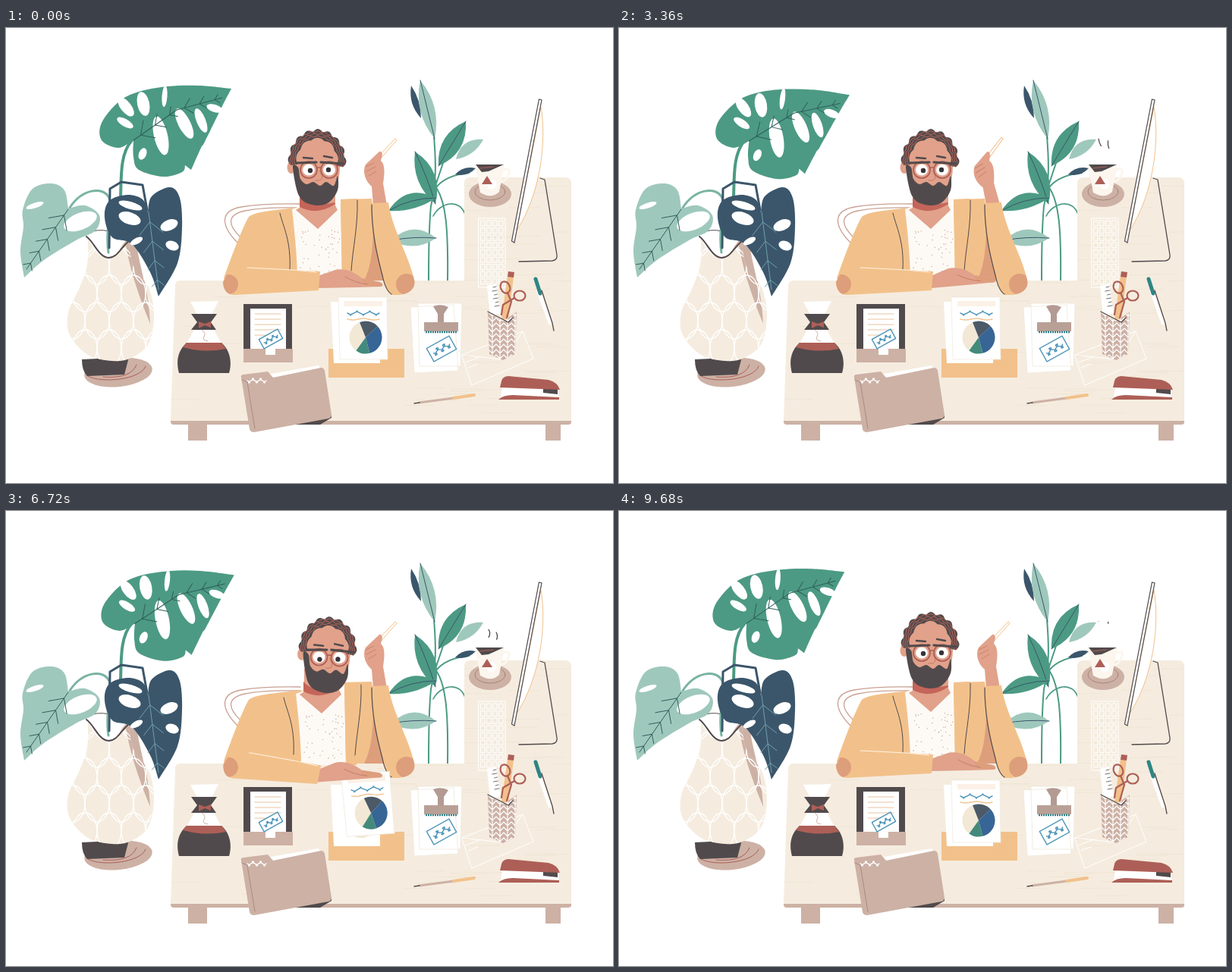
These frames come from a looping animation (800 by 600 pixels, 9760 ms). An HTML page:

```html
<!DOCTYPE html>
<html lang="en">
<head>
<meta charset="utf-8">
<title>At the desk</title>
<style>
html,body{margin:0;width:100%;height:100%;overflow:hidden;background:#fff}
svg{display:block;width:100vw;height:100vh}
.l{fill:none;stroke-linecap:round;stroke-linejoin:round}
.d{stroke:#514a4c}.w{stroke:#fff}.o{stroke:#f2c18b}.r{stroke:#ad5f57}.b{stroke:#4a93b8}
.dark{fill:#514a4c}.red{fill:#ad5f57}.tan{fill:#cdb1a5}.cream{fill:#f5ecdf}.coat{fill:#f2c18b}
.skin{fill:#e1a18a}.shade{fill:#dd9e7b}.white{fill:#fff}.pale{fill:#9fc8bc}.green{fill:#4c9a84}.navy{fill:#3b566b}
</style>
</head>
<body>
<!-- data-c: points of a smooth closed curve, a doubled point is a corner -->
<svg viewBox="0 0 800 600" xmlns="http://www.w3.org/2000/svg">
<defs>
<clipPath id="deskClip"><path d="M230 333H604V205Q604 197 612 197H737Q745 197 745 205V518H217L223 340Q223 333 230 333Z"/></clipPath>
<clipPath id="vaseClip"><path data-c="108,277 108,277 119,296 135,303 149,294 162,284 162,284 168,315 188,342 195,378 188,416 165,435 140,439 108,431 84,405 82,375 97,342 107,312"/></clipPath>
<clipPath id="cupClip"><path d="M635 374L655 387L673 374L671 430L655 438L637 430Z"/></clipPath>
<clipPath id="armR"><path d="M482 231L504 230C509 266 531 300 538 332C541 346 527 353 511 352C503 352 500 342 496 326C488 298 482 270 482 231Z"/></clipPath>
<clipPath id="armL"><path d="M298 312L414 321L412 346L301 352Q287 352 286 335Z"/></clipPath>
</defs>

<g class="l" stroke="#4c9a84" stroke-width="2">
  <path d="M564 143C567 180 567 205 560 235Q557 265 557 333"/>
  <path d="M563 248C572 230 598 224 605 246" stroke-width="1.6"/>
  <path d="M567 210Q580 194 610 191M567 205L577 175"/>
  <path d="M568 212C579 230 583 260 582 333"/>
</g>
<g id="plantR"></g>

<g class="l" stroke="#c9a193" stroke-width="1.3">
  <path id="chair" d="M306 284C282 260 282 241 310 236Q340 231 388 232"/>
  <path d="M309 276C291 258 292 246 315 241Q340 236 388 237"/>
</g>

<ellipse class="tan" cx="148" cy="454" rx="45" ry="19" transform="rotate(-6 148 454)"/>
<path class="l r" d="M108 459C125 469 178 464 184 446M128 460Q165 463 172 444"/>
<path class="dark" d="M100 437L162 434L156 457L107 459Q100 452 100 437Z"/>
<path class="l d" d="M107 271Q120 264 136 268"/>
<path class="l" stroke="#4c9a84" stroke-width="4" d="M166 148C150 166 152 196 151 225"/>
<path class="l" stroke="#79b3a2" stroke-width="3" d="M84 237C100 212 128 208 136 224C140 240 130 265 135 296"/>
<path class="l" stroke="#3b566b" stroke-width="3" d="M136 290L137 212L152 203L180 207L186 240"/>
<path class="tan" d="M150 292Q158 276 172 274C171 303 187 335 189 388Z"/>
<g clip-path="url(#vaseClip)">
  <path class="cream" d="M70 260H200V445H70Z"/>
  <path class="tan" d="M158 286L172 274C171 303 188 335 190 390Q165 330 158 286Z"/>
  <g id="scales" class="l w" stroke-width="1.3"></g>
</g>
<path class="l d" stroke-width="2" d="M106 275C116 282 122 302 135 303C149 303 152 285 170 275"/>

<path class="pale" data-c="24,329 24,329 19,295 23,262 22,240 35,212 60,205 77,214 82,238 82,238 104,234 123,247 118,267 92,280 50,306"/>
<g id="paleHoles"></g>
<g id="bigLeaf">
  <path class="green" data-c="297,80 297,80 285,103 262,150 257,158 244,187 244,187 236,181 236,181 232,190 207,196 175,187 168,170 168,148 168,148 148,158 126,148 126,125 149,97 175,84 213,77 255,76"/>
  <g id="bigHoles"></g>
</g>
<path class="navy" data-c="201,354 201,354 190,322 166,285 140,276 130,250 136,228 160,220 180,226 187,243 187,243 192,222 216,210 229,224 232,263 226,310"/>
<g id="navyHoles"></g>

<path class="tan" d="M240 520H265V544H240ZM711 520H731V544H711ZM217 515H745V520Q745 523 741 523H221Q217 523 217 519Z"/>
<g clip-path="url(#deskClip)">
  <path class="cream" d="M210 190H750V518H210Z"/>
  <path id="grain" class="l" stroke="#f0e5d4"/>
</g>

<path class="l d" stroke-width="1.3" d="M704 198L710 200L726 299Q727 306 720 307L676 308"/>
<path class="white" stroke="#f2c18b" d="M705 104C713 150 704 220 673 267Z"/>
<path class="white d" stroke-width="1.2" d="M702.500 94L706 95L670 283L666.500 281Z"/>
<path id="keys" class="l w"/>

<ellipse class="tan" cx="638" cy="219" rx="28" ry="17"/>
<ellipse class="l" cx="638" cy="216" rx="20" ry="11" stroke="#a98579"/>
<path class="l" stroke="#fcf6ee" stroke-width="3" d="M655 187Q667 183 662 194Q659 202 652 203"/>
<path fill="#fcf6ee" d="M618 180H657L650 216Q640 226 625 217Z"/>
<path class="dark" d="M619 180H656L636 189L627 190Z"/>
<path class="l r" d="M624 185L642 183"/>
<circle class="white" cx="640" cy="206" r="6.500"/>
<path class="red" d="M634 195L641 206H627Z"/>
<g class="l d" stroke-width="1.3" style="stroke-linecap:butt">
  <path id="steamA" pathLength="1" d="M633 180C628 171 641 167 637 158Q632 151 632 145"/>
  <path id="steamB" pathLength="1" d="M642 180C642 172 650 170 647 162Q643 154 645 146"/>
</g>

<path class="coat" d="M380 237C350 241 328 242 320 249C312 262 296 304 287 330L300 345L380 333H498L482 225L442 226L420 236Z"/>
<path class="shade" d="M484 262L498 333H472Q484 310 484 262Z"/>
<g id="shirt">
  <path fill="#fdfaf6" d="M377 239L390 234L441 226L443 333H384Q384 300 377 239Z"/>
  <path class="coat" d="M441 226L462 225L457 333H443Z"/>
  <g id="dots" fill="#d5b3a1"></g>
  <path class="skin" d="M382 240L388 236V206H434V234L437 240L411 265Z"/>
  <path fill="#c4655a" d="M387 223Q398 238 433 230L434 232Q410 248 387 236Z"/>
  <path class="l d" d="M361 244C365 262 376 280 374 319M463 227C464 262 457 290 455 320"/>
</g>
<g id="armUp">
  <path class="white o" d="M489 171L513 146L515 148L492 174Z"/>
  <path class="skin" d="M484 234L482 209C474 202 469 190 474 180L492 163Q495 162 496 167L494 175C500 180 499 193 497 205L502 234Z"/>
  <path class="l" stroke="#c98570" d="M474 183L485 178M475 189L487 183M478 195L488 189"/>
</g>
<g clip-path="url(#armR)">
  <path class="coat" d="M480 225H545V356H480Z"/>
  <circle class="shade" cx="528" cy="338" r="14"/>
</g>
<path class="l d" stroke-width="1.2" d="M482 233C482 270 489 300 496 326Q500 346 508 351"/>

<g id="head">
  <ellipse class="skin" cx="376" cy="184" rx="5.500" ry="8"/>
  <path class="skin" data-c="380,170 388,148 412,141 434,148 440,175 437,205 425,229 404,230 388,218 382,195"/>
  <path class="dark" data-c="378,183 385,184 388,199 396,206 405,203 414,208 422,203 432,208 437,195 437,214 424,231 403,233 386,221"/>
  <path id="hair" class="dark"/>
  <g id="curls" class="l" stroke="#c9685a" stroke-width=".9"></g>
  <path class="l d" stroke-width="2.500" d="M392 171L404 172M419 169L430 171"/>
  <g id="eyes">
    <path class="white" d="M391 187a8 7.500 0 0 1 16 0a8 7.500 0 0 1 -16 0M418 187a8 7.500 0 0 1 16 0a8 7.500 0 0 1 -16 0"/>
    <path id="pupils" class="l" stroke="#363338" stroke-width="6.400" d="M401 188h0M425 187h0"/>
  </g>
  <path id="lids" class="l" stroke="#a9604f" d="M392 189Q399 193 406 189M419 189Q426 193 433 189"/>
  <path class="l" stroke="#c07c68" d="M413 188C418 196 419 202 408 201"/>
  <path class="l r" stroke-width="1.700" d="M388 187a11 11 0 0 1 22 0a11 11 0 0 1 -22 0M415 187a11 11 0 0 1 22 0a11 11 0 0 1 -22 0M410 184H415"/>
  <path class="l d" stroke-width="3.200" d="M383 178L409 177M415 177L445 179"/>
</g>

<path class="white" d="M243 361L280 360L271 378H252ZM249 396H273L285 418H237Z"/>
<path class="dark" d="M244 377H278L270 388L277 398H244L252 388ZM238 415H284C296 426 298 441 294 455H228C224 440 226 426 238 415Z"/>
<path class="red" d="M238 415H284L290 423Q262 429 233 421ZM254 387L262 390L270 387V395L262 392L254 396Z"/>
<path class="l" stroke="#cdb1a5" d="M258 398Q264 402 261 407T266 413"/>

<path class="dark" d="M313 364H377V425H313Z"/><path class="white" d="M322 370H369V426H322Z"/>
<path id="lines" class="l" stroke="#e8c3a2"/>
<path class="tan" d="M313 423H378V441H313Z"/><path class="white" d="M342 423H355V431H342Z"/>

<path class="dark" d="M380 516L429 510V514L414 523H380Z"/>
<path class="white" d="M344 457L412 445L416 452L355 468Z"/>
<path class="tan" d="M310 461Q309 457 313 457L345 453L352 461L415 448Q419 448 420 452L429 510Q429 514 425 515L327 533Q322 533 321 529Z"/>
<path class="l" stroke="#a98b81" d="M311 464L318 467L328 528"/>

<path class="coat" d="M425 423H525V461H425Z"/>
<path class="white" d="M428 361H484L493 366V442H432Z"/>
<path fill="#f3e8d6" d="M452 420A17 17 0 0 0 484 420Z"/>
<g id="sheet">
  <path class="white" stroke="#f0e7db" stroke-width=".7" d="M438 355H502L503 437H440Z"/>
  <path fill="#fcf1e7" d="M446 360H496V367H446Z"/>
  <g id="notes"></g>
  <g id="pie"></g>
</g>

<g id="forearm">
  <g id="hand">
    <path class="skin" d="M411 327L434 319C447 316 460 322 469 330L493 335Q499 338 495 341L462 342L411 343Z"/>
    <path class="shade" d="M468 331L494 336Q497 340 493 341L473 339Z"/>
    <path class="l" stroke="#c07c68" stroke-width=".9" d="M447 328Q460 336 476 338"/>
  </g>
  <path class="coat" d="M298 312L378 319L414 321L412 346L301 352Q287 352 286 335Z"/>
  <path class="l" stroke="#fff4e4" d="M318 316L378 319L409 322"/>
  <circle class="shade" cx="293" cy="338" r="13" clip-path="url(#armL)"/>
</g>

<path class="white" stroke="#f0e7db" stroke-width=".8" d="M533 368L590 365L596 452L538 455ZM543 363H601L599 446H545Z"/>
<path fill="#b39a92" d="M563 367Q573 363 583 368L577 377V388H569V377Z"/>
<path fill="#b9a097" d="M551 388H596V400H551Z"/>
<path stroke="#2f7f86" stroke-width="2.500" stroke-dasharray="2 1" d="M553 401H595"/>
<g id="stamps"></g>

<path class="l w" d="M601 431L681 400L695 436L614 471ZM601 431L655 437L681 400M606 441L626 433M609 448L622 443"/>

<path class="white" d="M634 340L646 337L652 376L638 380Z"/>
<path id="ticks" class="l d" stroke-width=".8"/>
<path class="coat" d="M661 327L669 328L662 384H653Z"/><path class="red" d="M662 321L670 322L669 329L661 328Z"/>
<g class="l r" stroke-width="2.200"><ellipse cx="658" cy="342" rx="6" ry="8" transform="rotate(-25 658 342)"/><ellipse cx="677" cy="353" rx="7.500" ry="6.500"/><path d="M661 349L666 361L660 382M670 356L655 365L653 378"/></g>
<g clip-path="url(#cupClip)"><path class="tan" d="M630 370H680V440H630Z"/><path id="weave" class="l w" stroke-width="1.2"/></g>
<path class="l d" stroke-width="1.3" d="M635 374L662 388L668 382"/>

<path class="l" stroke="#cdb1a5" stroke-width="3" d="M545 494L590 488"/><path class="l o" stroke-width="4" d="M590 488L617 484"/>
<path class="l d" stroke-width="1.3" d="M538 495L545 494"/>
<path class="l w" stroke-width="5" d="M702 347L717 389"/>
<path class="l" stroke="#2f8584" stroke-width="5" d="M698 331L704 350"/>
<path class="l d" stroke-width="1.3" d="M706 346L720 389L722 399"/>

<path class="white" d="M654 474H728V487H652Z"/>
<path class="dark" d="M708 475H727V483L708 481Z"/>
<path class="red" d="M652 470Q653 459 662 459L715 464Q727 467 730 477L704 476L651 474ZM649 490Q655 484 668 484L729 487V490Z"/>
</svg>
<script>
const $ = id => document.getElementById(id);
const LOOP = 9760, STEP = 80, TAU = 2 * Math.PI;

let seed = 7;
const rnd = () => (seed = seed * 16807 % 2147483647) / 2147483647;
const repeat = (n, f) => Array.from({length: n}, (_, i) => f(i)).join('');
const line = (n, f) => 'M' + repeat(n + 1, i => f(i / n).map(v => v.toFixed(1)) + ' ');

// smooth closed curve through points
function blob(pts) {
  const n = pts.length, at = i => pts[(i + n) % n];
  return `M${pts[0]}` + repeat(n, i => {
    const [a, b, c, d] = [-1, 0, 1, 2].map(k => at(i + k));
    if (b + '' === c + '') return '';
    return `C${b.map((v, k) => v + (c[k] - a[k]) / 6)} ${c.map((v, k) => v - (d[k] - b[k]) / 6)} ${c}`;
  }) + 'Z';
}
document.querySelectorAll('[data-c]').forEach(p =>
  p.setAttribute('d', blob(p.dataset.c.split(' ').map(s => s.split(',').map(Number)))));

// pointed leaf between two ends, optionally bent and with a midrib
function leaf(x1, y1, x2, y2, w, cls, bend = 0, rib = '') {
  const len = Math.hypot(x2 - x1, y2 - y1), ux = (y1 - y2) / len, uy = (x2 - x1) / len;
  const mid = s => `${(x1 + x2) / 2 + ux * s} ${(y1 + y2) / 2 + uy * s}`;
  const vein = rib && `<path class="l" stroke="${rib}" d="M${x1} ${y1}Q${mid(bend)} ${x2} ${y2}"/>`;
  return `<path class="${cls}" d="M${x1} ${y1}Q${mid(bend + w)} ${x2} ${y2}Q${mid(bend - w)} ${x1} ${y1}Z"/>` + vein;
}
const hole = (x, y, rx, ry, a) =>
  `<ellipse class="white" cx="${x}" cy="${y}" rx="${rx}" ry="${ry}" transform="rotate(${a} ${x} ${y})"/>`;

// midrib with paired side veins
function veins(x1, y1, x2, y2, n, size, color) {
  const dx = x2 - x1, dy = y2 - y1, len = Math.hypot(dx, dy), ux = dx / len, uy = dy / len;
  return `<path class="l" stroke="${color}" d="M${x1} ${y1}L${x2} ${y2}` + repeat(n, i => {
    const f = (i + .5) / n, x = x1 + dx * f, y = y1 + dy * f, s = size * (1 - f * .6);
    return [1, -1].map(k => `M${x} ${y}l${(ux - k * uy) * s * .7} ${(uy + k * ux) * s * .7}`).join('');
  }) + '"/>';
}

// pen scribble
const scribble = (x, y, w, amp, n, cls) => `<path class="l ${cls}" stroke-width="1.4" d="` +
  line(24, f => [x + w * f + amp * .7 * Math.sin(f * n * TAU * 2), y + amp * Math.sin(f * n * TAU)]) + '"/>';

$('plantR').innerHTML =
  leaf(534, 76, 547, 119, 9, 'navy', 2) + leaf(546, 69, 565, 146, 19, 'pale', 0, '#3b566b') +
  leaf(629, 147, 593, 173, 15, 'pale', 4) + leaf(606, 123, 570, 182, 24, 'green', 0, '#3b566b') +
  leaf(539, 163, 566, 232, 23, 'green', -3, '#3b566b') + leaf(592, 193, 619, 185, 8, 'navy') +
  leaf(504, 241, 567, 224, 20, 'green', -9, '#3b566b') + leaf(508, 280, 567, 277, 22, 'pale', -4, '#3b566b');

$('paleHoles').innerHTML = hole(98, 255, 23, 11, -22) + hole(38, 234, 12, 3.5, -18) +
  veins(82, 239, 27, 318, 5, 22, '#2f5f5c');
$('bigHoles').innerHTML =
  hole(158, 104, 7, 15, -38) + hole(181, 100, 8, 16, -12) + hole(209, 90, 3.5, 14, 4) +
  hole(157, 125, 12, 5, 30) + hole(180, 166, 5, 8, 22) + hole(204, 142, 9, 26, -13) +
  hole(235, 126, 8, 22, -27) + hole(257, 122, 6, 17, -22) + hole(275, 106, 11, 5, 18) +
  veins(168, 148, 225, 108, 3, 22, '#2f5f5c') + veins(225, 108, 285, 92, 3, 16, '#2f5f5c');
$('navyHoles').innerHTML =
  hole(164, 234, 16, 5, 16) + hole(163, 251, 15, 8, 18) + hole(215, 260, 12, 7, -22) +
  hole(219, 287, 9, 6, 20) + hole(172, 281, 9, 4, -28) + veins(188, 243, 201, 345, 4, 24, '#6f9fae');

$('scales').innerHTML = repeat(25, i => {
  const row = Math.floor(i / 5);
  return `<ellipse cx="${72 + i % 5 * 32 + row % 2 * 16}" cy="${278 + row * 36}" rx="16" ry="24"/>`;
});
$('grain').setAttribute('d', repeat(90, () =>
  `M${215 + rnd() * 510} ${200 + rnd() * 315}q${8 + rnd() * 20} ${rnd() * 3 - 1.5} 40 0`));
$('dots').innerHTML = repeat(44, () =>
  `<circle cx="${388 + rnd() * 52}" cy="${266 + rnd() * 60}" r=".8"/>`);
$('keys').setAttribute('d', 'M623 251H658V342H623Z' + repeat(36, i =>
  `M${626 + i % 4 * 8} ${254 + Math.floor(i / 4) * 9.6}h5v7h-5z`));
$('weave').setAttribute('d', repeat(40, i =>
  `M${636 + i % 4 * 10} ${368 + Math.floor(i / 4) * 7}l5 5l5 -5`) + repeat(4, i => `M${641 + i * 10} 370V438`));
$('lines').setAttribute('d', repeat(5, i => `M328 ${377 + i * 7}h${i < 4 ? 34 : 14}`));
$('ticks').setAttribute('d', repeat(6, i => `M${646 + i * .8} ${341 + i * 5}l${i % 2 ? -6 : -4} 1`));

const stamp = (x, y, w, h) => `<g transform="translate(${x} ${y}) rotate(-29)">
  <rect class="l b" stroke-width="1.4" x="${-w / 2}" y="${-h / 2}" width="${w}" height="${h}"/>
  ${scribble(-w * .36, 0, w * .72, h * .2, 2.5, 'b')}</g>`;
$('stamps').innerHTML = stamp(349, 410, 28, 14) + stamp(574, 423, 34, 20) + scribble(318, 465, 25, 3, 2.5, 'w');
$('notes').innerHTML = scribble(450, 376, 42, 3, 2.5, 'b') + scribble(450, 384, 42, 1, 1.5, 'o');

// slices as [from, to, colour] in turns, clockwise from the top
$('pie').innerHTML = '<circle cx="474" cy="408" r="21.5" fill="#f3e8d6"/>' +
  [[-.06, .13, '#4c5967'], [.13, .46, '#376596'], [.46, .6, '#438a7c']].map(([a, b, fill]) => {
    const rim = u => `${474 + 21.5 * Math.sin(u * TAU)} ${408 - 21.5 * Math.cos(u * TAU)}`;
    return `<path fill="${fill}" d="M474 408L${rim(a)}A21.5 21.5 0 0 1 ${rim(b)}Z"/>`;
  }).join('');

// hair is a scalloped band around the forehead
const crown = (k, wob, n) => f => {
  const a = Math.PI * (1.04 - f * 1.1), r = k + wob * Math.abs(Math.sin(f * n * Math.PI));
  return [410 + 35 * r * Math.cos(a), 176 - 39 * r * Math.sin(a)];
};
const inner = crown(.74, .06, 5);
$('hair').setAttribute('d', line(60, crown(1, .1, 9)) + line(40, f => inner(1 - f)).replace('M', 'L') + 'Z');
$('curls').innerHTML = repeat(3, i => `<path d="${line(50, crown(.82 + i * .08, .05, 11 + i))}"/>`);

const clamp = u => Math.min(1, Math.max(0, u));
const ease = u => (u = clamp(u)) * u * (3 - 2 * u);
// 0 to 1 from on, back to 0 from off
const hold = (t, on, off, dur) => ease((t - on) / dur) - ease((t - off) / dur);
const put = (id, v) => $(id).setAttribute('transform', v);
const swing = (id, deg, x, y) => put(id, `rotate(${deg} ${x} ${y})`);

function steam(id, p) {
  const len = .32 * Math.sqrt(Math.sin(p * Math.PI));
  $(id).setAttribute('stroke-dasharray', `0 ${p} ${Math.min(len, 1 - p)} 2`);
}

function draw(t) {
  const half = LOOP / 2;
  swing('bigLeaf', 1.9 * (.78 - Math.cos((t - 530) / half * TAU)), 151, 210);

  const turn = hold(t, 4700, 8480, 800);
  put('head', `translate(${15 * turn - 3 * hold(t, 5760, 8480, 800)} ${6 * turn}) rotate(${2 * turn} 410 230)`);
  put('shirt', `translate(${5 * turn} ${2 * turn})`);
  put('pupils', `translate(${-turn} ${2 * turn})`);
  const shut = t >= 8320 && t < 8560;
  $('eyes').style.display = shut ? 'none' : '';
  $('lids').style.display = shut ? '' : 'none';

  swing('armUp', -6 * hold(t, 700, 4300, 1300) - 3.5 * hold(t, 7200, 8560, 1000), 492, 232);
  const pull = hold(t, 6240, 7500, 600);
  swing('forearm', 7 * hold(t, 5760, 8560, 720), 296, 338);
  swing('hand', -4 * hold(t, 700, 5700, 1000) - 11 * pull, 413, 334);
  put('sheet', `translate(${8 * pull} ${-11 * pull}) rotate(${-4.5 * pull} 474 408)`);

  const p = t % half / half;
  steam('steamA', p);
  steam('steamB', Math.max(0, p - .06));
}

const start = performance.now();
function tick() {
  const t = (performance.now() - start) % LOOP;
  draw(Math.floor(t / STEP) * STEP);
  requestAnimationFrame(tick);
}
tick();
</script>
</body>
</html>
```
